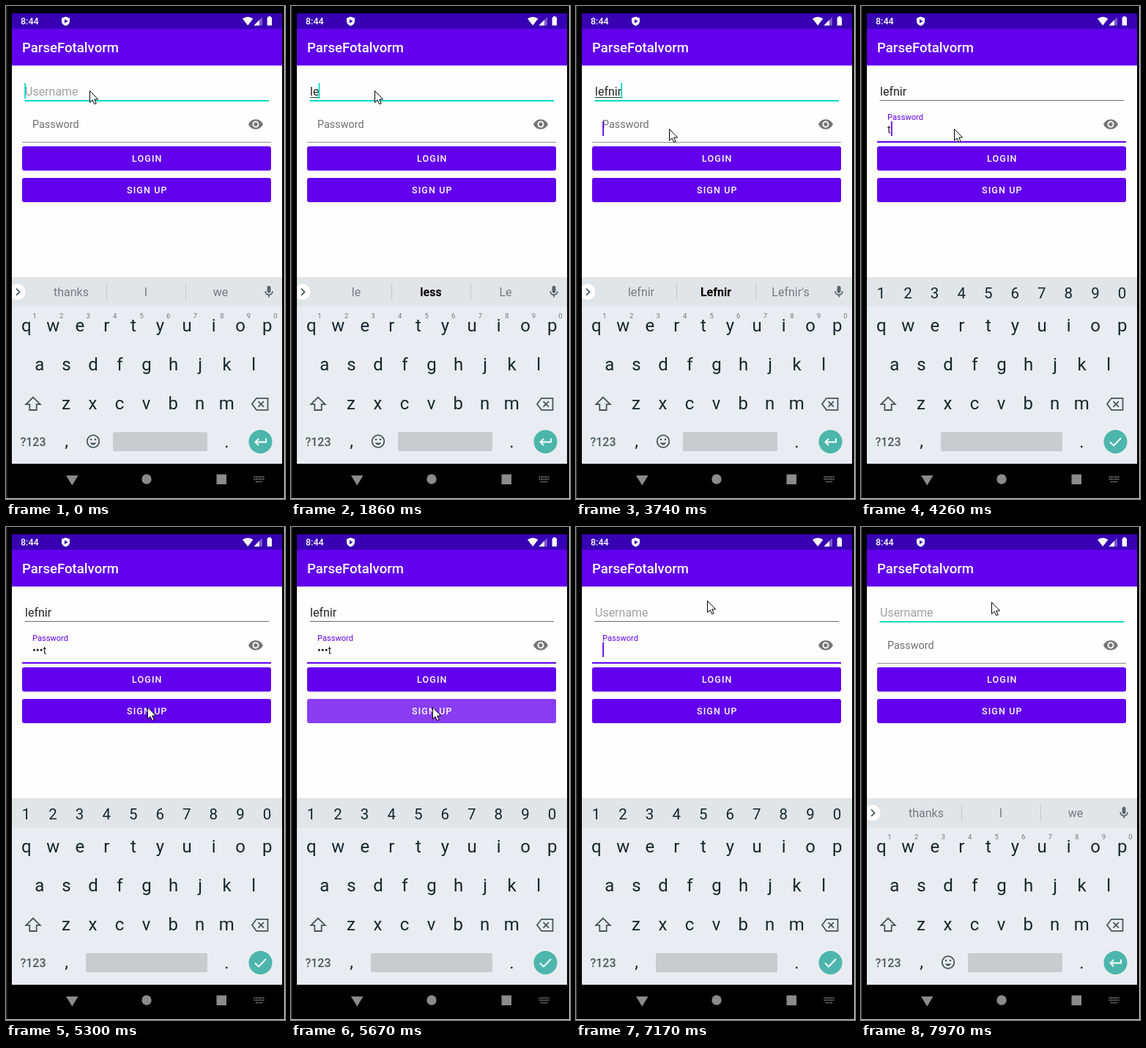
Recreate the animation shown at these times as an HTML page. Size 381x671 px, loop 8 s.

```html
<!DOCTYPE html>
<html lang="en">
<head>
<meta charset="utf-8">
<title>Login screen</title>
<style>
  html, body { margin: 0; width: 100%; height: 100%; overflow: hidden; background: #000; }
  svg { display: block; width: 381px; height: 671px; font-family: Roboto, sans-serif; }
  text { white-space: pre; }
  .mid { text-anchor: middle; }
  .btn { font-size: 12.5px; font-weight: 500; letter-spacing: 1.12px; fill: #fff; }
  .key { font-size: 24px; fill: #14262e; }
  .digit { font-size: 20.5px; fill: #14262e; }
  .hint { font-size: 9.5px; fill: #70777b; }
  .sug { font-size: 16px; fill: #757b80; }
  .bold { font-weight: 700; fill: #000; }
  .line { fill: none; stroke: #46555c; stroke-width: 1.8; }
</style>
</head>
<body>
<svg viewBox="0 0 381 671">
  <defs>
    <clipPath id="screen"><rect x="8" y="10" width="369" height="613"/></clipPath>
    <clipPath id="signup"><rect x="22" y="234" width="340" height="33" rx="3"/></clipPath>
  </defs>
  <rect width="381" height="671" fill="#000"/>
  <rect width="1.5" height="671" fill="#333"/>
  <path d="M380 0h1v671H0v-1h380z" fill="#ddd"/>

  <g clip-path="url(#screen)">
    <rect x="8" y="10" width="369" height="21" fill="#3700b3"/>
    <rect x="8" y="31" width="369" height="50" fill="#6200ee"/>
    <rect x="8" y="81" width="369" height="288" fill="#fefefe"/>
    <rect x="8" y="369" width="369" height="40" fill="#e1e5e8"/>
    <rect x="8" y="409" width="369" height="214" fill="#e9edf1"/>

    <g fill="#fff">
      <text x="20" y="25" font-size="12.5" font-weight="500">8:44</text>
      <path d="M81.5 14.5l5.5 2v4.200c0 3-2.500 5.300-5.500 6.300c-3-1-5.500-3.300-5.500-6.300v-4.200z"/>
      <path d="M80 18l4.500 2.700l-4.500 2.700z" fill="#3700b3"/>
      <path d="M323 17.300q7.200-5 14.400 0l-7.200 9.200z"/>
      <path d="M350 15v11.500h-11.500z" opacity=".35"/>
      <path d="M346 19v7.500h-7.500z"/>
      <path d="M358.200 14h3.200v1.500h1.600v11h-6.400v-11h1.600z"/>
      <text x="22" y="63" font-size="18.600" font-weight="500">ParseFotalvorm</text>
    </g>

    <text id="user" x="26" y="122" font-size="16"></text>
    <rect id="compose" x="26" y="124" height="1" fill="#333"/>
    <rect id="userLine" x="25.500" width="333.500"/>
    <rect id="userCaret" y="105" width="1.800" height="21" fill="#03dac5"/>

    <text id="label" x="36">Password</text>
    <text id="pass" x="36" y="173" font-size="14.400" fill="#222"></text>
    <rect id="passLine" x="22" width="340"/>
    <rect id="passCaret" y="157" width="1.800" height="20" fill="#6200ee"/>
    <path transform="translate(330.200 150.200) scale(.9)" fill="#757575" d="M12 4.500C7 4.500 2.730 7.610 1 12c1.730 4.390 6 7.500 11 7.500s9.270-3.110 11-7.500c-1.730-4.390-6-7.500-11-7.500zM12 17c-2.760 0-5-2.240-5-5s2.240-5 5-5 5 2.240 5 5-2.240 5-5 5zm0-8c-1.660 0-3 1.340-3 3s1.340 3 3 3 3-1.340 3-3-1.340-3-3-3z"/>

    <rect x="22" y="191" width="340" height="33" rx="3" fill="#6200ee"/>
    <rect x="22" y="234" width="340" height="33" rx="3" fill="#6200ee"/>
    <circle id="ripple" cx="193" cy="248" fill="#fff" opacity=".24" clip-path="url(#signup)"/>
    <text class="btn mid" x="192.800" y="212.400">LOGIN</text>
    <text class="btn mid" x="192.800" y="255.400">SIGN UP</text>

    <g id="letters"></g>
    <g class="line">
      <path d="M37 532.500l-9.700 9.700h5v7.800h9.400v-7.800h5z"/>
      <path d="M342 533.800h15.500v16H342l-6-8z"/>
      <path d="M344.500 538.200l7.500 7.500m0-7.500l-7.500 7.500"/>
    </g>
    <text class="mid" x="37" y="598.500" font-size="16" font-weight="500" fill="#4b5a61">?123</text>
    <text class="key mid" x="82.500" y="600">,</text>
    <text class="key mid" x="301.500" y="601">.</text>
    <circle cx="347.500" cy="593" r="16" fill="#4db6ac"/>

    <g id="wordKeys">
      <circle cx="15.500" cy="389" r="10.800" fill="#fff"/>
      <path class="line" d="M14 384.700l4.500 4.500l-4.500 4.500"/>
      <path d="M137.500 378v22M245.500 378v22" stroke="#c3c8cb"/>
      <text class="sug mid" x="89" y="395"></text>
      <text class="sug mid" x="191" y="395"></text>
      <text class="sug mid" x="293" y="395"></text>
      <path transform="translate(349.200 379.200) scale(.82)" fill="#59656b" d="M12 14c1.660 0 3-1.340 3-3V5c0-1.660-1.340-3-3-3S9 3.340 9 5v6c0 1.660 1.340 3 3 3zm5-3c0 2.760-2.240 5-5 5s-5-2.240-5-5H5c0 3.530 2.610 6.430 6 6.920V21h2v-3.080c3.390-.490 6-3.390 6-6.920z"/>
      <g id="hints"></g>
      <circle class="line" cx="119" cy="592.500" r="8.300"/>
      <path d="M114.500 594.500q4.500 6 9 0z" fill="#46555c"/>
      <circle cx="116" cy="590" r="1.300" fill="#46555c"/>
      <circle cx="122" cy="590" r="1.300" fill="#46555c"/>
      <rect x="146" y="580" width="129" height="26" rx="2" fill="#c8cccf"/>
      <path d="M355 588.500v5h-14.500m4.500-4.500l-4.500 4.500l4.500 4.500" fill="none" stroke="#fff" stroke-width="1.900"/>
    </g>
    <g id="passKeys">
      <g id="digits"></g>
      <rect x="109" y="580" width="166" height="26" rx="2" fill="#c8cccf"/>
      <path d="M340 593.500l5 5l10-10.500" fill="none" stroke="#fff" stroke-width="1.900"/>
    </g>
  </g>

  <g fill="#8b8b8b">
    <path d="M82 639h16.500l-8.200 13.500z"/>
    <circle cx="192" cy="644" r="6.700"/>
    <rect x="287.500" y="637.500" width="13.500" height="13.500"/>
    <path d="M338.500 641h14M338.500 644h14M341 647.500h9" fill="none" stroke="#8b8b8b" stroke-width="1.600" stroke-dasharray="1.700 .8"/>
  </g>

  <path id="pointer" d="M.5.5v15.800l3.600-3.400l2.600 5.600l2.500-1.100l-2.500-5.400h4.900z" fill="#fff" stroke="#000"/>
</svg>
<script>
const LOOP = 8000, PITCH = 36.55;
const PURPLE = '#6200ee', TEAL = '#03dac5';
const $ = id => document.getElementById(id);

function row(parent, chars, x, y, cls) {
  [...chars].forEach((c, i) => {
    const el = document.createElementNS('http://www.w3.org/2000/svg', 'text');
    el.setAttribute('class', cls + ' mid');
    el.setAttribute('x', x + i * PITCH);
    el.setAttribute('y', y);
    el.textContent = c;
    $(parent).append(el);
  });
}
row('letters', 'qwertyuiop', 27.7, 443, 'key');
row('letters', 'asdfghjkl', 45.8, 496, 'key');
row('letters', 'zxcvbnm', 82, 549, 'key');
row('hints', '1234567890', 39, 425, 'hint');
row('digits', '1234567890', 27.5, 397.5, 'digit');

// Each step changes only the listed properties.
const idle = ['thanks', 'I', 'we'];
const steps = [
  [0, { user: '', pass: '', compose: 0, words: idle, focus: 'user', userCaret: 1, passCaret: 0,
        lift: 0, secret: 0, ripple: 0, at: [114, 115] }],
  [760, { userCaret: 0 }],
  [1180, { userCaret: 1 }],
  [1590, { userCaret: 0 }],
  [1860, { user: 'le', words: ['le', 'less', 'Le'], compose: 1, userCaret: 1 }],
  [2160, { user: 'lef', words: ['lef', 'left', 'leftovers'] }],
  [2410, { user: 'lefn', words: ['lefn', 'lefnir', "Lefnir's"] }],
  [2560, { user: 'lefni', words: ['lefni', 'Lefnir', "Lefnir's"] }],
  [2680, { user: 'lefnir', words: ['lefnir', 'Lefnir', "Lefnir's"] }],
  [3230, { userCaret: 0 }],
  [3350, { at: [117, 130] }],
  [3470, { at: [124, 157] }],
  [3590, { at: [127, 167], userCaret: 1 }],
  [3740, { passCaret: 1 }],
  [3870, { focus: 'pass', userCaret: 0, compose: 0, lift: .8 }],
  [3990, { lift: 1, secret: 1 }],
  [4260, { pass: 't' }],
  [4380, { pass: '•e' }],
  [4500, { pass: '••s' }],
  [4770, { pass: '•••t' }],
  [5150, { at: [191, 243] }],
  [5300, { at: [193, 245], passCaret: 0 }],
  [5550, { ripple: 80 }],
  [5670, { ripple: 200 }],
  [5820, { ripple: 0, user: '', pass: '', passCaret: 1 }],
  [6250, { at: [190, 150] }],
  [6370, { at: [184, 92], passCaret: 0 }],
  [6640, { at: [183, 95] }],
  [6770, { at: [182, 98], passCaret: 1 }],
  [7170, { at: [179, 100] }],
  [7320, { userCaret: 1 }],
  [7440, { at: [178, 102], focus: 'user', passCaret: 0, lift: .4, words: idle }],
  [7590, { lift: 0, secret: 0 }],
  [7970, { userCaret: 0 }]
];

function set(id, attrs) {
  for (const k in attrs) $(id).setAttribute(k, attrs[k]);
}
function show(id, on) {
  $(id).style.display = on ? '' : 'none';
}
function underline(id, bottom, focused, color, rest) {
  const h = focused ? 2 : 1;
  set(id, { y: bottom - h, height: h, fill: focused ? color : rest });
}

function draw(t) {
  const s = Object.assign({}, ...steps.filter(e => e[0] <= t).map(e => e[1]));
  const inPass = s.focus === 'pass';

  $('user').textContent = s.user || 'Username';
  set('user', { fill: s.user ? '#222' : '#a0a0a0' });
  const width = s.user ? $('user').getComputedTextLength() : 0;
  set('userCaret', { x: 25.2 + width });
  set('compose', { width });
  underline('userLine', inPass ? 129 : 130, !inPass, TEAL, '#6e6e6e');
  show('userCaret', s.userCaret);
  show('compose', s.compose);

  $('pass').textContent = s.pass;
  set('passCaret', { x: 36.2 + (s.pass ? $('pass').getComputedTextLength() : 0) });
  set('label', {
    y: 166 - 11 * s.lift,
    'font-size': 14.4 - 3.3 * s.lift,
    fill: inPass ? PURPLE : '#6f6f6f'
  });
  underline('passLine', 186, inPass, PURPLE, '#8f8f8f');
  show('passCaret', s.passCaret);

  document.querySelectorAll('.sug').forEach((el, i) => {
    el.textContent = s.words[i];
    el.classList.toggle('bold', i === 1 && s.words !== idle);
  });
  show('wordKeys', !s.secret);
  show('passKeys', s.secret);
  set('ripple', { r: s.ripple });
  set('pointer', { transform: `translate(${s.at})` });
}

const start = performance.now();
function tick() {
  draw((performance.now() - start) % LOOP);
  requestAnimationFrame(tick);
}
tick();
</script>
</body>
</html>
```
